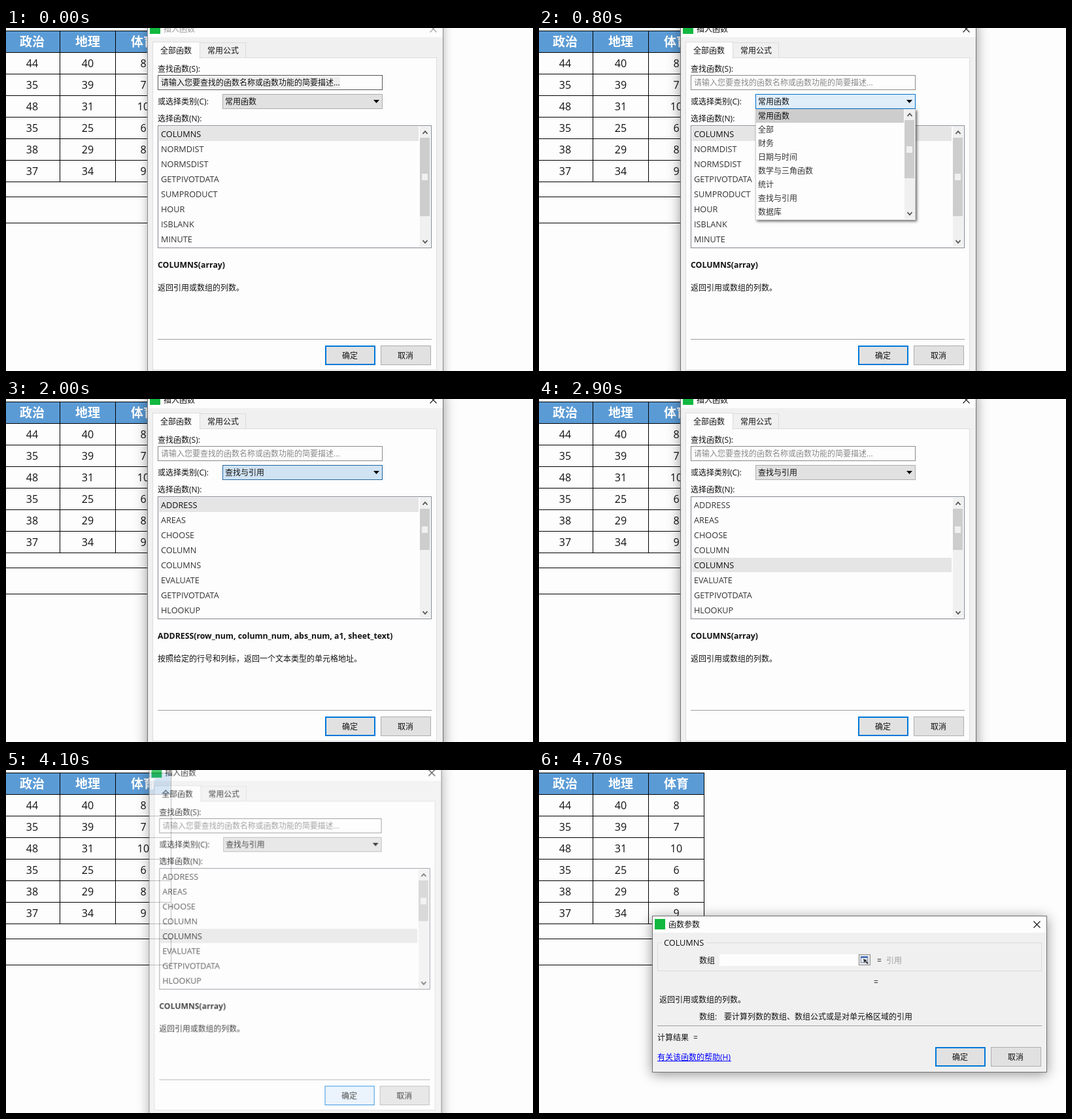
An HTML page with a canvas for the animation above (5300 ms loop, 806 by 525 pixels).

```html
<!DOCTYPE html>
<html lang="zh-CN">
<head>
<meta charset="utf-8">
<title>插入函数</title>
<style>
  html, body { margin: 0; width: 100%; height: 100%; overflow: hidden; background: #fdfdfd; }
  canvas { display: block; }
</style>
</head>
<body>
<canvas id="stage" width="806" height="525"></canvas>
<script>
const LOOP = 5300, STEP = 100, PAD = 40;
const W = 806, H = 525, WHITE = '#fdfdfd', FACE = '#f0f0f0', BLUE = '#0078d7';
const FONT = '"Open Sans", "Noto Sans CJK SC", "Noto Sans CJK", sans-serif';

const stage = document.getElementById('stage').getContext('2d');
const buffer = document.createElement('canvas');
buffer.width = W;
buffer.height = H + 2 * PAD;
const layer = buffer.getContext('2d');
let g = stage;

const usual = ['COLUMNS', 'NORMDIST', 'NORMSDIST', 'GETPIVOTDATA', 'SUMPRODUCT', 'HOUR', 'ISBLANK', 'MINUTE'];
const lookup = ['ADDRESS', 'AREAS', 'CHOOSE', 'COLUMN', 'COLUMNS', 'EVALUATE', 'GETPIVOTDATA', 'HLOOKUP'];
const groups = ['常用函数', '全部', '财务', '日期与时间', '数学与三角函数', '统计', '查找与引用', '数据库'];
const columns = [
  ['政治', 44, 35, 48, 35, 38, 37],
  ['地理', 40, 39, 31, 25, 29, 34],
  ['体育', 8, 7, 10, 6, 8, 9]
];

const clamp = v => Math.max(0, Math.min(1, v));
// Progress in equal steps, the first one already visible at the start time
const ramp = (t, start, steps) => clamp((t - start) / STEP / steps + 1 / steps);

function mix(a, b, p) {
  const part = (c, i) => parseInt(c.slice(1 + 2 * i, 3 + 2 * i), 16);
  return `rgb(${[0, 1, 2].map(i => Math.round(part(a, i) + (part(b, i) - part(a, i)) * p))})`;
}

function rect(x, y, w, h, fill) {
  g.fillStyle = fill;
  g.fillRect(x, y, w, h);
}

function box(x, y, w, h, fill, edge, line = 1) {
  rect(x, y, w, h, edge);
  rect(x + line, y + line, w - 2 * line, h - 2 * line, fill);
}

function text(s, x, cy, { size = 12, color = '#111', weight = 400, align = 'left' } = {}) {
  g.font = `${weight} ${size}px ${FONT}`;
  g.fillStyle = color;
  g.textAlign = align;
  g.fillText(s, x, cy + Math.round(size * 0.38));
}

function path(points, color, width) {
  g.beginPath();
  points.forEach(([x, y]) => g.lineTo(x, y));
  if (width) {
    g.strokeStyle = color;
    g.lineWidth = width;
    g.stroke();
  } else {
    g.fillStyle = color;
    g.fill();
  }
}

function cross(x, y, color) {
  path([[x - 5, y - 5], [x + 5, y + 5]], color, 1.1);
  path([[x - 5, y + 5], [x + 5, y - 5]], color, 1.1);
}

function chevron(x, y, dir) {
  path([[x - 3.5, y + 2 * dir], [x, y - 2 * dir], [x + 3.5, y + 2 * dir]], '#505050', 1.8);
}

function scrollbar(x, top, bottom, thumbTop, thumbBottom) {
  rect(x, top, 16, bottom - top, FACE);
  rect(x, thumbTop, 15, thumbBottom - thumbTop, '#cdcdcd');
  rect(x + 3, Math.round((thumbTop + thumbBottom) / 2) - 5, 9, 10, FACE);
  chevron(x + 8, top + 9, 1);
  chevron(x + 8, bottom - 8, -1);
}

function button(label, x, y, { main = false, hover = 0 } = {}) {
  const fill = mix('#e1e1e1', '#e5f1fb', hover);
  box(x, y, 77, 30, fill, main ? BLUE : '#adadad');
  if (main) box(x + 1, y + 1, 75, 28, fill, mix(BLUE, '#e5f1fb', hover));
  text(label, x + 38, y + 15, { align: 'center' });
}

function shadowed(x, y, w, h, fill, color, blur, dx, dy) {
  g.save();
  g.shadowColor = color;
  g.shadowBlur = blur;
  g.shadowOffsetX = dx;
  g.shadowOffsetY = dy;
  rect(x, y, w, h, fill);
  g.restore();
}

function windowFrame(x, y, w, h, title, active) {
  const ink = active ? '#111' : '#999';
  shadowed(x, y, w, h, FACE, `rgba(0,0,0,${active ? 0.42 : 0.3})`, active ? 18 : 13, 0, 3);
  box(x, y, w, h, FACE, active ? '#707070' : '#8c8c8c');
  rect(x + 1, y + 1, w - 2, 25, WHITE);
  rect(x + 4, y + 5, 16, 16, '#12b83f');
  text(title, x + 25, y + 13, { color: ink });
  cross(x + w - 15.5, y + 13.5, ink);
}

function table() {
  rect(0, 5, 252, 32, '#5b9bd5');
  for (let i = 0; i < 8; i++) rect(0, 4 + 33 * i, 253, 1, '#000');
  rect(0, 258, 253, 1, '#000');
  rect(0, 298, 253, 1, '#000');
  rect(252, 258, 1, 41, '#000');
  columns.forEach(([head, ...cells], c) => {
    const x = 40 + 85 * c;
    rect(82 + 85 * c, 4, 1, 232, '#000');
    text(head, x, 21, { size: 19, color: '#fff', weight: 700, align: 'center' });
    cells.forEach((n, r) => text(n, x, 54 + 33 * r, { size: 16, align: 'center' }));
  });
}

function combo(t, chosen) {
  let fill, edge;
  if (t < 600) {
    const p = ramp(t, 200, 3);
    fill = mix('#e1e1e1', '#e5f1fb', p);
    edge = mix('#adadad', BLUE, p);
  } else if (t < 1900) {
    const p = 0.2 + 0.8 * ramp(t, 1000, 4);
    fill = mix('#e5f1fb', '#cce4f7', p);
    edge = mix(BLUE, '#005499', p);
  } else {
    const p = clamp((t - 1900) / 500);
    fill = mix('#cce4f7', '#e1e1e1', p);
    edge = mix('#005499', '#adadad', p);
  }
  box(331, 101, 245, 23, fill, edge);
  text(chosen ? groups[6] : groups[0], 335, 112);
  path([[562, 110], [571, 110], [566.5, 115]], '#000');
}

function dropdown(t) {
  const height = Math.round(170 * ramp(t, 600, 3));
  let pick = 0;
  if (t >= 1000) pick = Math.min(4, 1 + Math.floor((t - 1000) / STEP));
  if (t >= 1500) pick = t < 1600 ? 5 : 6;
  shadowed(331, 124, 245, height, WHITE, 'rgba(0,0,0,.6)', 4, 2, 2);
  g.save();
  g.beginPath();
  g.rect(331, 124, 245, height);
  g.clip();
  box(331, 123, 245, 171, WHITE, '#d0d0d0');
  rect(332, 124 + 21 * pick, 226, 21, '#cdcdcd');
  groups.forEach((s, i) => text(s, 335, 134 + 21 * i, { color: i === pick ? '#111' : '#333' }));
  scrollbar(559, 124, 292, 141, 230);
  g.restore();
}

function chooser(t) {
  const active = t >= 600, chosen = t >= 1900, open = active && !chosen;
  const names = chosen ? lookup : usual;
  const row = t >= 2900 ? 4 : 0;
  windowFrame(216, -12, 453, 552, '插入函数', active);

  box(224, 45, 435, 479, WHITE, '#dcdcdc');
  box(296, 22, 71, 24, FACE, '#dcdcdc');
  box(224, 21, 73, 26, WHITE, '#dcdcdc');
  rect(225, 45, 71, 3, WHITE);
  text('全部函数', 236, 34);
  text('常用公式', 308, 34);

  text('查找函数(S):', 232, 62);
  box(232, 72, 344, 23, WHITE, active ? '#8a8a8a' : '#555');
  if (!active) rect(236, 75, 275, 17, '#efefef');
  text('请输入您要查找的函数名称或函数功能的简要描述...', 237, 83, { color: active ? '#888' : '#111' });

  text('或选择类别(C):', 232, 112);
  combo(t, chosen);

  text('选择函数(N):', 232, 138);
  box(232, 149, 419, 188, WHITE, '#828790');
  rect(234, 151 + 23 * row, 397, 22, '#e5e5e5');
  names.forEach((s, i) => text(s, 237, 162 + 23 * i, { size: 12.7, color: i === row ? '#111' : '#333' }));
  scrollbar(633, 151, 335, 168, chosen ? 231 : 288);

  const address = chosen && row === 0;
  text(address ? 'ADDRESS(row_num, column_num, abs_num, a1, sheet_text)' : 'COLUMNS(array)',
    232, 362, { size: 12.3, weight: 700 });
  text(address ? '按照给定的行号和列标，返回一个文本类型的单元格地址。' : '返回引用或数组的列数。', 232, 397);

  rect(232, 476, 419, 1, '#a0a0a0');
  button('确定', 488, 486, { main: true, hover: ramp(t, 3500, 3) });
  button('取消', 573, 486);
  if (open) dropdown(t);
}

function pickerIcon(x, y) {
  box(x, y, 18, 17, '#e6e6e6', '#8e8e8e');
  box(x + 3, y + 3, 11, 10, '#fff', '#6f87b5');
  rect(x + 3, y + 3, 11, 3, '#4d74b8');
  path([[x + 7, y + 7], [x + 13, y + 9], [x + 11, y + 10], [x + 15, y + 14],
    [x + 13, y + 15], [x + 10, y + 11], [x + 8, y + 13]], '#333');
}

function argumentsWindow(t) {
  windowFrame(173, 223, 604, 240, '函数参数', true);
  box(181, 264, 588, 44, FACE, '#dcdcdc');
  rect(188, 262, 68, 5, FACE);
  text('COLUMNS', 191, 264, { size: 12.7 });
  text('数组', 245, 291);
  rect(276, 282, 212, 18, WHITE);
  if (t < 4700) rect(281, 283, 1, 17, '#000');
  pickerIcon(489, 282);
  text('=', 517, 291);
  text('引用', 531, 291, { color: '#a0a0a0' });
  text('=', 512, 324);
  text('返回引用或数组的列数。', 184, 351);
  text('数组:', 245, 377);
  text('要计算列数的数组、数组公式或是对单元格区域的引用', 283, 377);
  rect(181, 391, 588, 1, '#a0a0a0');
  text('计算结果', 181, 409);
  text('=', 236, 409);
  text('有关该函数的帮助(H)', 181, 439, { color: '#00f' });
  rect(181, 445, 113, 1, '#00f');
  button('确定', 606, 424, { main: true });
  button('取消', 691, 424);
}

// Draws a window as one group, so that it can fade and zoom as a whole
function zoomed(paint, cx, cy, scale, alpha) {
  g = layer;
  g.setTransform(1, 0, 0, 1, 0, 0);
  g.clearRect(0, 0, W, H + 2 * PAD);
  g.translate(0, PAD);
  paint();
  g = stage;
  g.save();
  g.globalAlpha = alpha;
  g.translate(cx, cy);
  g.scale(scale, scale);
  g.drawImage(buffer, -cx, -cy - PAD);
  g.restore();
}

function draw(t) {
  rect(0, 0, W, H, WHITE);
  table();
  if (t < 4100) return chooser(t);
  const out = (t - 4100) / STEP;
  if (out < 3) zoomed(() => chooser(t), 442.5, 250, [0.989, 0.968, 0.945][out], [0.76, 0.36, 0.08][out]);
  if (t >= 4500) argumentsWindow(t);
  else if (t >= 4300) {
    const p = ramp(t, 4300, 3);
    zoomed(() => argumentsWindow(t), 475, 343, 1 - 0.1 * (1 - p) ** 2, p);
  }
}

const begin = performance.now();
function tick() {
  const t = (performance.now() - begin) % LOOP;
  draw(Math.floor(t / STEP) * STEP);
  requestAnimationFrame(tick);
}
tick();
</script>
</body>
</html>
```
